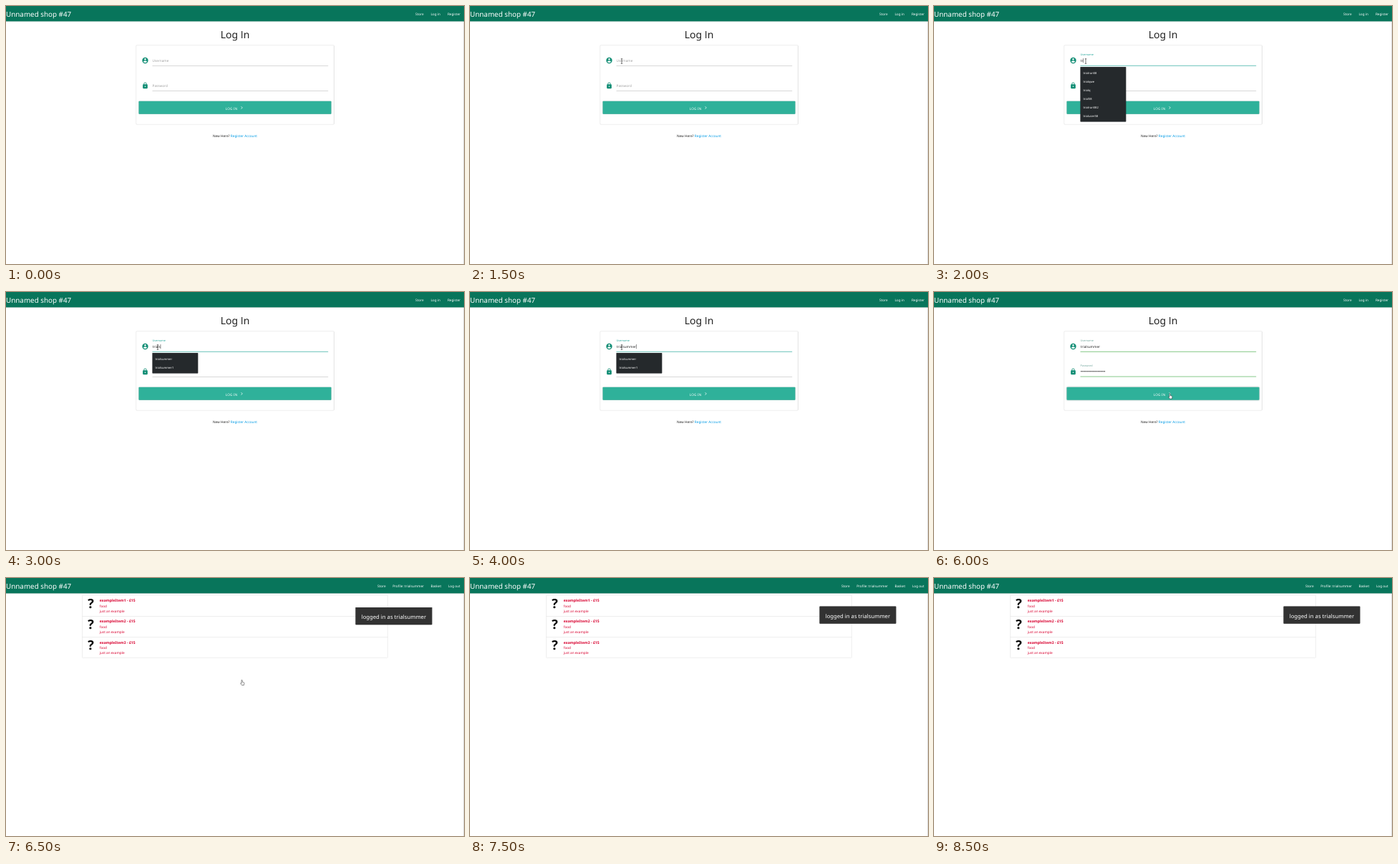
An HTML page for the animation above (9.5 s loop, 640x360 px).

```html
<!DOCTYPE html>
<html lang="en">
<head>
<meta charset="utf-8">
<title>Shop log in</title>
<style>
html, body { margin: 0; width: 100%; height: 100%; overflow: hidden; background: #fff; }
svg { display: block; width: 100%; height: 100%; }
text { font: 4.7px "Noto Sans", "Open Sans", sans-serif; fill: #222; white-space: pre; text-rendering: geometricPrecision; }
.white text, text.white { fill: #fff; }
.raised { filter: drop-shadow(0 .6px .6px rgba(0,0,0,.3)); }
</style>
</head>
<body>
<svg id="stage" viewBox="0 0 640 360">
  <rect width="640" height="360" fill="#fff"/>
  <rect x="639" y="21" width="1" height="339" fill="#dedede"/>
  <rect class="raised" width="640" height="21.4" fill="#08755b"/>
  <text class="white" x="0" y="14.8" style="font-size:9.85px">Unnamed shop #47</text>

  <g id="loginPage">
    <g id="guestNav" class="white"></g>
    <text x="320" y="45" text-anchor="middle" style="font-size:14px">Log <tspan font-family="Open Sans, sans-serif">I</tspan>n</text>
    <rect class="raised" x="182" y="55" width="276.3" height="110" rx=".7" fill="#fff" stroke="#e4e4e4" stroke-width=".3"/>
    <g fill="#108d74">
      <path transform="translate(189.5 71) scale(.4167)" d="M12 2a10 10 0 1 0 0 20a10 10 0 0 0 0-20zm0 3a3 3 0 1 1 0 6a3 3 0 0 1 0-6zm0 14.2a7.2 7.2 0 0 1-6-3.2c0-2 4-3.1 6-3.1s6 1.100 6 3.100a7.200 7.200 0 0 1-6 3.200z"/>
      <path transform="translate(189.5 106) scale(.4167)" fill-rule="evenodd" d="M18 8h-1V6A5 5 0 0 0 7 6v2H6a2 2 0 0 0-2 2v10a2 2 0 0 0 2 2h12a2 2 0 0 0 2-2V10a2 2 0 0 0-2-2zM12 17a2 2 0 1 1 0-4a2 2 0 0 1 0 4zM8.900 8V6a3.100 3.100 0 0 1 6.200 0v2z"/>
    </g>
    <g id="fields"></g>
    <text id="userText" x="204.800" y="78"></text>
    <g id="dots"></g>
    <rect id="button" x="185.500" y="132.700" width="269" height="18.100" rx=".7" fill="#2fb19a"/>
    <text class="white" x="306.700" y="145.400" style="letter-spacing:.14px">LOG IN</text>
    <path d="M328.600 140.200l1.700 1.700l-1.700 1.700" fill="none" stroke="#fff" stroke-width=".75"/>
    <text x="320" y="182.600" text-anchor="middle">New Here? <tspan fill="#039be5">Register Account</tspan></text>
    <g id="menu" class="white"></g>
    <rect id="caret" width=".5" height="6.200" fill="#222"/>
  </g>

  <g id="storePage">
    <g id="userNav" class="white"></g>
    <g id="items"></g>
    <g id="toast">
      <rect class="raised" x="488.400" y="39.400" width="107" height="24.300" rx=".7" fill="#323232"/>
      <text id="toastText" class="white" x="496.700" y="55.700" style="font-size:7.7px"></text>
    </g>
  </g>

  <path id="beam" d="M210.800 73.700h2.400M212 73.700v6.600M210.800 80.300h2.400" fill="none" stroke="#222" stroke-width=".6"/>
  <path id="hand" d="M0 .6a.6.6 0 0 1 1.200 0v2.200l2 .5q.8.300.700 1.100l-.4 2.800h-3l-1.900-2.500q.2-.9 1.400 0z" fill="#fff" stroke="#222" stroke-width=".5"/>
  <path id="arrow" d="M159 135.500v5.500l1.300-1.200l.9 2l.9-.4l-.9-1.900h1.700z" fill="#fff" stroke="#222" stroke-width=".5"/>
</svg>
<script>
const LOOP = 9500, STEP = 500;
const USER = "trialsummer";
const ALL = ["trialrun58", "trialqwe", "trialq", "trial58", "trialrun582", "trialuser58"];
const MATCHES = [USER, USER + "1"];
const TEAL = "#26a69a", GREY = "#9e9e9e", GREEN = "#4caf50", BLURRED = "#72a69c";
const RED = "#d8002f";

const $ = id => document.getElementById(id);

function add(parent, tag, attrs, text) {
  const el = document.createElementNS("http://www.w3.org/2000/svg", tag);
  for (const key in attrs) el.setAttribute(key, attrs[key]);
  if (text) el.textContent = text;
  return parent.appendChild(el);
}

const show = (el, on) => el.setAttribute("display", on ? "inline" : "none");

function nav(id, links) {
  for (const [x, label] of links) add($(id), "text", { x, y: 12.8 }, label);
}
nav("guestNav", [[572, "Store"], [593.4, "Log in"], [616.9, "Register"]]);
nav("userNav", [[519, "Store"], [540.2, "Profile: " + USER], [593.4, "Basket"], [617.9, "Log out"]]);

function makeField(name, top) {
  const label = add($("fields"), "text", { x: 204.6 }, name);
  const line = add($("fields"), "rect", { x: 204.5, width: 245.7 });
  return (focused, filled) => {
    const up = focused || filled;
    label.setAttribute("y", top + (up ? -7.2 : 2));
    label.style.fontSize = up ? "3.76px" : "4.7px";
    label.style.fill = focused ? TEAL : filled ? BLURRED : GREY;
    line.setAttribute("y", top + (up ? 6.9 : 7.2));
    line.setAttribute("height", up ? .67 : .4);
    return color => line.setAttribute("fill", color);
  };
}
const userField = makeField("Username", 76);
const passField = makeField("Password", 110.8);

for (let i = 0; i < 16; i++) add($("dots"), "circle", { cx: 205.9 + i * 2.16, cy: 110.8, r: .75, fill: "#222" });

function makeMenu(names) {
  const g = add($("menu"), "g", {});
  add(g, "rect", { class: "raised", x: 204.5, y: 84.9, width: 63.8, height: 4.6 + names.length * 12, rx: .4, fill: "#25292c" });
  names.forEach((name, i) => add(g, "text", { x: 208.4, y: 94.6 + i * 12, style: "font-size:4.1px" }, name));
  return g;
}
const fullMenu = makeMenu(ALL), shortMenu = makeMenu(MATCHES);

const list = $("items");
add(list, "rect", { x: 106.6, y: 24, width: 426.8, height: 87.3, rx: .7, fill: "#fff", stroke: "#dcdcdc", "stroke-width": .5 });
for (let i = 0; i < 3; i++) {
  const y = 24 + i * 29.1;
  if (i) add(list, "rect", { x: 106.6, y, width: 426.8, height: .5, fill: "#dcdcdc" });
  add(list, "text", { x: 118.5, y: y + 17.8, "text-anchor": "middle", style: "font-size:18px;font-weight:700;fill:#000" }, "?");
  add(list, "text", { x: 130.8, y: y + 9.3, style: `font-size:5.1px;font-weight:700;fill:${RED}` }, `exampleItem${i + 1} - £15`);
  add(list, "text", { x: 130.8, y: y + 16.7, style: `fill:${RED}` }, "food");
  add(list, "text", { x: 130.8, y: y + 24.1, style: `fill:${RED}` }, "just an example");
}
$("toastText").textContent = "logged in as " + USER;

// Letters of the user name present at each half second, from 2 s on
const typed = [2, 5, 6, 9, 11];

function draw(ms) {
  const t = Math.floor((ms % LOOP) / STEP) * STEP;
  const login = t < 6500;
  show($("loginPage"), login);
  show($("storePage"), !login);

  const count = t < 2000 ? 0 : typed[Math.min((t - 2000) / STEP, 4)];
  $("userText").textContent = USER.slice(0, count);
  const inUser = t >= 2000 && t < 4500, inPass = t >= 4500 && t < 6000;
  userField(inUser, count > 0)(t >= 4500 ? GREEN : inUser ? TEAL : GREY);
  passField(inPass, t >= 5000)(t >= 4500 ? GREEN : GREY);

  show(fullMenu, t >= 2000 && t < 3000);
  show(shortMenu, t >= 3000 && t < 4500);
  show($("dots"), t >= 5000);

  show($("caret"), inUser || inPass);
  const end = inUser ? $("userText").getComputedTextLength() : t >= 5000 ? 35.2 : 0;
  $("caret").setAttribute("x", 204.8 + end);
  $("caret").setAttribute("y", inUser ? 73 : 107.6);

  $("button").style.filter = `drop-shadow(0 .6px ${t >= 6000 ? 1 : .5}px rgba(0,0,0,.3))`;

  show($("beam"), t >= 1500 && t < 5500);
  show($("hand"), t >= 5500 && t < 7000);
  $("hand").setAttribute("transform", `translate(329 ${login ? 141.8 : 142.3})`);
  show($("arrow"), t === 8000);
  $("toast").setAttribute("transform", `translate(0 ${t === 6500 ? 1.5 : 0})`);
}

const start = performance.now();
function tick() {
  draw(performance.now() - start);
  requestAnimationFrame(tick);
}
tick();
</script>
</body>
</html>
```
